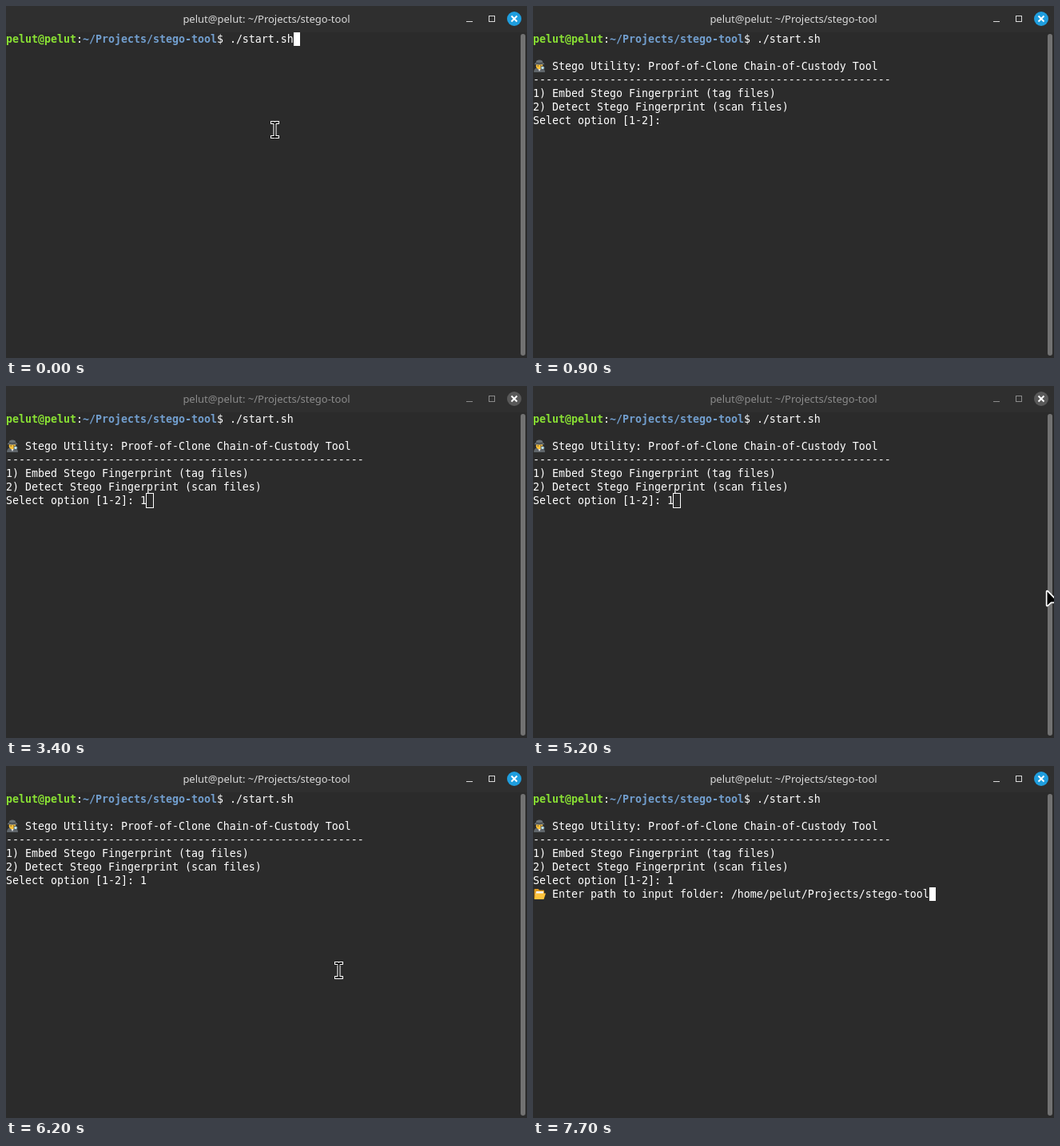
An HTML page that plays this animation: 652x441 px, repeating every 8 s.

```html
<!DOCTYPE html>
<html lang="en">
<head>
<meta charset="utf-8">
<title>Terminal</title>
<style>
  html, body { margin: 0; width: 100%; height: 100%; overflow: hidden; background: #2b2b2b; }
  #stage { position: relative; width: 652px; height: 441px; overflow: hidden; background: #2b2b2b; }
  #stage > * { position: absolute; }
  #bar { left: 0; top: 0; width: 652px; height: 33px; background: #2f2f2f; color: #dadada; }
  #bar.dim { color: #8b8b8b; }
  #title {
    width: 652px; text-align: center; white-space: pre;
    font: 13px/32px "Noto Sans", "Open Sans", sans-serif;
  }
  #bar svg { position: absolute; left: 570px; top: 0; }
  #close { fill: #1f9ede; }
  .dim #close { fill: #595959; }
  #text {
    left: 0; top: 33px; margin: 0; color: #fff;
    font: 13.29px/17px "DejaVu Sans Mono", monospace;
  }
  #text b { color: #8ae234; }
  #text b + b { color: #729fcf; }
  #scroll { left: 644px; top: 35px; width: 6px; height: 403px; border-radius: 3px; background: #727272; }
  #cursor { width: 8px; height: 17px; }
  #cursor.solid { background: #fff; }
  #cursor.hollow { outline: 1px solid #fff; }
  #art { left: 0; top: 0; }
  .edge { fill: none; stroke: #fff; stroke-width: 4; }
  .core { fill: none; stroke: #000; stroke-width: 1.8; }
</style>
</head>
<body>
<div id="stage">
  <div id="bar">
    <div id="title"></div>
    <svg width="82" height="33">
      <path d="M6 19.5h8" stroke="currentColor"/>
      <rect x="34.5" y="12.5" width="7" height="7" fill="none" stroke="currentColor"/>
      <circle id="close" cx="66" cy="16" r="9"/>
      <path d="M62.5 12.5l7 7m0-7l-7 7" stroke="#fff" stroke-width="2"/>
    </svg>
  </div>
  <pre id="text"></pre>
  <div id="scroll"></div>
  <div id="cursor"></div>
  <svg id="art" width="652" height="441">
    <g id="detective">
      <path d="M1 83q0-5 4-5.500h6q4 .5 4 5.500z" fill="#60666b"/>
      <path d="M6 78l2 4 2-4z" fill="#eee"/>
      <circle cx="8" cy="75" r="4.300" fill="#fcc23a"/>
      <path d="M5.500 75h1.500m2 0h1.500" stroke="#4a3a2a"/>
      <path d="M1.500 73q2.500-1.500 3-4.500 3.500-2 7 0 .5 3 3 4.500-6.500 1.500-13 0z" fill="#6b7378"/>
      <path d="M4 71.500q4 1 8 0" fill="none" stroke="#34393c"/>
      <circle cx="12" cy="77.500" r="2.200" fill="#bfe3f2" stroke="#3c4144" stroke-width=".8"/>
    </g>
    <g id="folder">
      <path d="M1.500 166v-11q0-1 1-1h4l1.500 1.500h5q1 0 1 1V166z" fill="#e09a1c"/>
      <path d="M4 157h9v6H3z" fill="#f4f4f4"/>
      <path d="M1.500 167l2.500-7.500h12L13.500 167z" fill="#fdc23c"/>
    </g>
    <g id="beam"></g>
    <path id="arrow" d="M643.500 257.500v17.300l4.700-4.300h8z" stroke="#fff" stroke-width="3.400"
      stroke-linejoin="round" paint-order="stroke"/>
  </svg>
</div>
<script>
const $ = id => document.getElementById(id);
const LOOP = 8000, CELL = 8, LINE = 17, TOP = 33;
const user = 'pelut', dir = 'Projects/stego-tool';

$('title').textContent = `${user}@${user}: ~/${dir}`;

const ibeam = 'M-3.500-9H-1.500L0-8L1.500-9H3.500M0-8V8M-3.500 9H-1.500L0 8L1.500 9H3.500';
$('beam').innerHTML = ['edge', 'core'].map(c =>
  `<path class="${c}" stroke-linecap="square" d="${ibeam}"/>`).join('');

const prompt = `<b>${user}@${user}</b>:<b>~/${dir}</b>$ ./start.sh`;
const menu = [
  prompt, '',
  '   Stego Utility: Proof-of-Clone Chain-of-Custody Tool',
  '-'.repeat(56),
  '1) Embed Stego Fingerprint (tag files)',
  '2) Detect Stego Fingerprint (scan files)',
  'Select option [1-2]: '
].join('\n');
const chosen = menu + '1';
const ask = chosen + '\n   Enter path to input folder: ';

// Each step changes only the listed parts of the state.
const steps = [
  [0, { text: prompt, at: [45, 0], cursor: 'solid', beam: [336.5, 155], arrow: false, dim: false }],
  [200, { at: [0, 1], beam: null }],
  [300, { text: menu, at: [21, 6] }],
  [800, { beam: [495.5, 53] }],
  [900, { beam: null, cursor: '' }],
  [1500, { cursor: 'solid' }],
  [2100, { cursor: '' }],
  [2200, { cursor: 'solid' }],
  [2300, { text: chosen, at: [22, 6] }],
  [2800, { cursor: '' }],
  [3400, { cursor: 'hollow', dim: true }],
  [5200, { arrow: true }],
  [5300, { arrow: false, beam: [590.5, 258] }],
  [5400, { beam: [500.5, 258] }],
  [5500, { beam: [435.5, 257] }],
  [5600, { beam: [416.5, 256], cursor: 'solid', dim: false }],
  [6200, { cursor: '' }],
  [6500, { text: ask, at: [31, 7], cursor: 'solid', beam: null }],
  [7100, { cursor: '' }],
  [7200, { cursor: 'hollow' }],
  [7700, { text: `${ask}/home/${user}/${dir}`, at: [62, 7], cursor: 'solid' }]
];

const show = (id, on) => { $(id).style.display = on ? '' : 'none'; };

function draw(s) {
  $('text').innerHTML = s.text;
  $('bar').className = s.dim ? 'dim' : '';
  $('cursor').className = s.cursor;
  $('cursor').style.left = s.at[0] * CELL + 'px';
  $('cursor').style.top = TOP + s.at[1] * LINE + 'px';
  show('detective', s.text !== prompt);
  show('folder', s.text.startsWith(ask));
  show('arrow', s.arrow);
  show('beam', s.beam);
  if (s.beam) $('beam').setAttribute('transform', `translate(${s.beam})`);
}

let shown = 0;
function tick() {
  const now = performance.now() % LOOP;
  const past = steps.filter(([time]) => time <= now);
  if (past.length !== shown) {
    shown = past.length;
    draw(Object.assign({}, ...past.map(([, change]) => change)));
  }
  requestAnimationFrame(tick);
}
tick();
</script>
</body>
</html>
```
